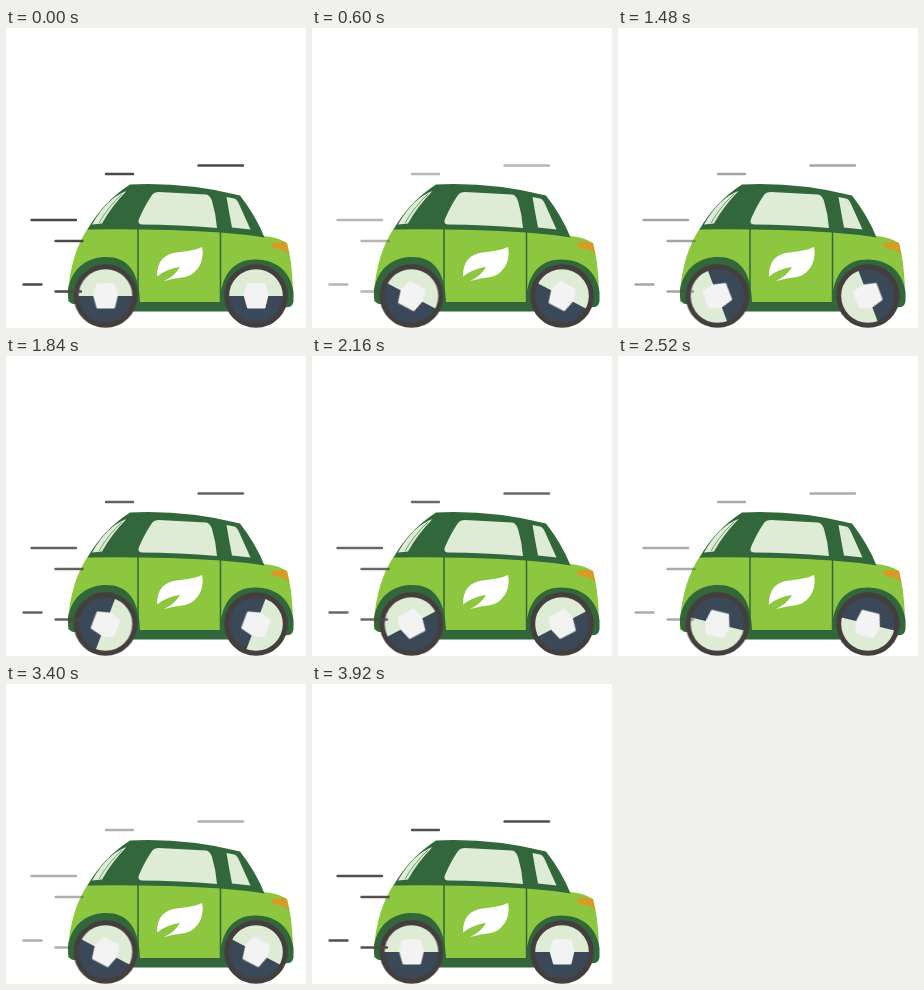
Recreate the animation shown at these times as an HTML page. Size 300 px wide and 300 px high, loop 3960 ms.

```html
<!DOCTYPE html>
<html lang="en">
<head>
<meta charset="utf-8">
<title>Green car</title>
<style>
  html, body { margin: 0; width: 100%; height: 100%; overflow: hidden; background: #fff; }
  svg { display: block; width: 100vw; height: 100vh; }
  .spin { transform-origin: 0 0; }
  .dark { fill: #31673a; }
  .glass { fill: #deecd6; }
</style>
</head>
<body>
<svg viewBox="0 0 300 300">
  <defs>
    <g id="rim">
      <circle r="29" class="glass"/>
      <path d="M-29 0A29 29 0 0 0 29 0Z" fill="#3b4858"/>
      <path d="M-8 -11.5H8.5L11.5 -1L8.5 11.5H-8L-11.5 -1Z" fill="#f3f3f3"
            stroke="#f3f3f3" stroke-width="2" stroke-linejoin="round"/>
    </g>
  </defs>

  <!-- body -->
  <path fill="#8dc73f" d="M82 200C70 218 64 240 62 264V274H287V262Q286 232 281 215Q272 209 257 208L214 200Z"/>
  <path class="dark" d="M81.500 201.500Q97 174 124 156.500Q180 154 234 167.500Q250 188 258.500 209.500Q236 206 214 204.500Q150 200.500 81.500 201.500Z"/>
  <path class="dark" d="M62 262C66 239 82 229 100 229C120 229 133 241 134 274H214C215 243 231 231 250 231.500C272 232 285 245 287.500 264V273Q287 278 283 279L222 283.500H127L68 276Q61 276 62 262Z"/>
  <path d="M132 201V275M214.500 203V275" stroke="#31673a" stroke-width="1.500"/>

  <!-- windows -->
  <g class="glass">
    <path d="M120.500 163Q101 170 86 196.500L96 195.500Q105 179 120.500 163Z"/>
    <path d="M153 164L200 166.500Q204 167 206 173Q210 186 211 200Q172 196.500 136 196.500Q131 196 133 191Q139 177 146 167Q148 164 153 164Z"/>
    <path d="M220.500 169L228 170.500Q231 171 233 176L244.500 201.500L226 199.500Q223 184 220.500 169Z"/>
  </g>
  <path d="M93 195Q102 179 116 166" fill="none" stroke="#31673a" stroke-width=".6"/>

  <path fill="#d99b28" d="M265 215.500Q274 213 281 215L283 226.500Q278 221 269 220.500Q265 219 265 215.500Z"/>
  <path fill="#fff" d="M151 248.500C151 233 158 226 171 224.500C182 223 190 222 196 219C199 232 192 246 179 249Q169 250 158 253Q169 248 174 239Q162 240 151 248.500Z"/>

  <g id="wheels"></g>
  <g id="wind" fill="none" stroke="#4f4646" stroke-width="2.400" stroke-linecap="round">
    <path d="M100 146H127M192.500 137.500H237M25.500 192H70M49.500 213H76.500M17.500 256.500H35.500M49.500 263.500H75"/>
  </g>
</svg>
<script>
  const FRAMES = 99, TURNS = 7, TURN = 14;
  const timing = { duration: FRAMES * 40, iterations: Infinity, easing: `steps(${FRAMES})` };

  // Each turn takes 13 steps and rests for one.
  const spin = [];
  for (let i = 0; i < TURNS; i++) {
    spin.push(
      { offset: i * TURN / FRAMES, transform: `rotate(${i * 360}deg)` },
      { offset: (i * TURN + TURN - 1) / FRAMES, transform: `rotate(${(i + 1) * 360}deg)` });
  }
  spin.push({ offset: 1, transform: `rotate(${TURNS * 360}deg)` });

  const wheels = document.getElementById('wheels');
  wheels.innerHTML = [99.5, 250].map(x => `
    <g transform="translate(${x} 268)">
      <g class="spin"><use href="#rim"/></g>
      <circle r="29.300" fill="none" stroke="#443e3c" stroke-width="5"/>
    </g>`).join('');

  const running = [...wheels.querySelectorAll('.spin')].map(el => el.animate(spin, timing));
  running.push(document.getElementById('wind').animate({ opacity: [1, 0, 1, 0, 1] }, timing));
  running.forEach(a => { a.startTime = document.timeline.currentTime; });
</script>
</body>
</html>
```
